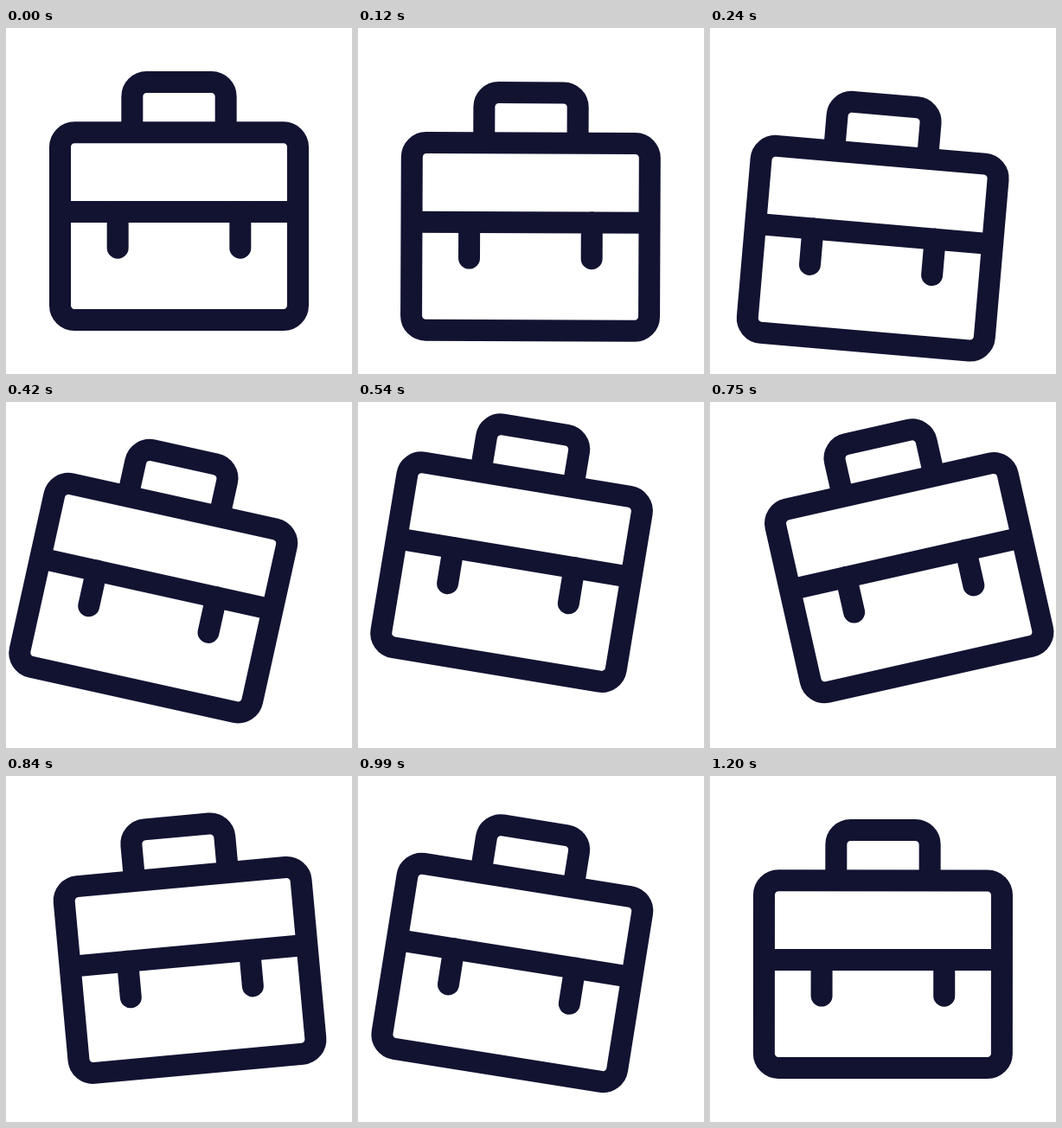
An HTML page for the animation above (1.23 s loop, 400 px wide and 400 px high).

```html
<!DOCTYPE html>
<html lang="en">
<head>
<meta charset="utf-8">
<title>Swinging briefcase</title>
<style>
  html, body { margin: 0; height: 100%; overflow: hidden; background: #fff; }
  svg { display: block; width: 100%; height: 100%; }
</style>
</head>
<body>
<svg viewBox="0 0 24 24">
  <g id="bag" fill="none" stroke="#121331" stroke-width="1.5">
    <rect x="3.75" y="7.25" width="16.5" height="13" rx="1"/>
    <path d="M8.75 7.25V4.75a1 1 0 0 1 1-1h4.5a1 1 0 0 1 1 1v2.5M3.75 12.75h16.5"/>
    <path stroke-linecap="round" d="M7.75 12.75v2.5M16.25 12.75v2.5"/>
  </g>
</svg>
<script>
const LOOP = 1230, STEP = 30;
const UNIT = 24 / 400;

// Ease in and out, slightly quicker at the start
function ease(x) {
  const u = x ** 0.89;
  return u * u * (3 - 2 * u);
}

// Value at time t, easing from one [ms, value] key to the next
function follow(keys, t) {
  const next = keys.findIndex(([time]) => time > t);
  if (next < 0) return keys.at(-1)[1];
  if (next === 0) return keys[0][1];
  const [t0, v0] = keys[next - 1], [t1, v1] = keys[next];
  return v0 + (v1 - v0) * ease((t - t0) / (t1 - t0));
}

// The bag dips and jumps in pixels; its swing in degrees trails behind
const jump = [[0, 0], [285, 27.5], [640, -42], [895, 0]];
const swing = [[98, 0], [480, 13.2], [780, -13.3], [950, 10], [1210, 0]];

const bag = document.getElementById('bag');
const start = performance.now();

function draw() {
  const elapsed = (performance.now() - start) % LOOP;
  const t = Math.floor(elapsed / STEP) * STEP;
  bag.setAttribute('transform',
    `translate(0 ${follow(jump, t) * UNIT}) rotate(${follow(swing, t)} 12 5.5)`);
  requestAnimationFrame(draw);
}
draw();
</script>
</body>
</html>
```
